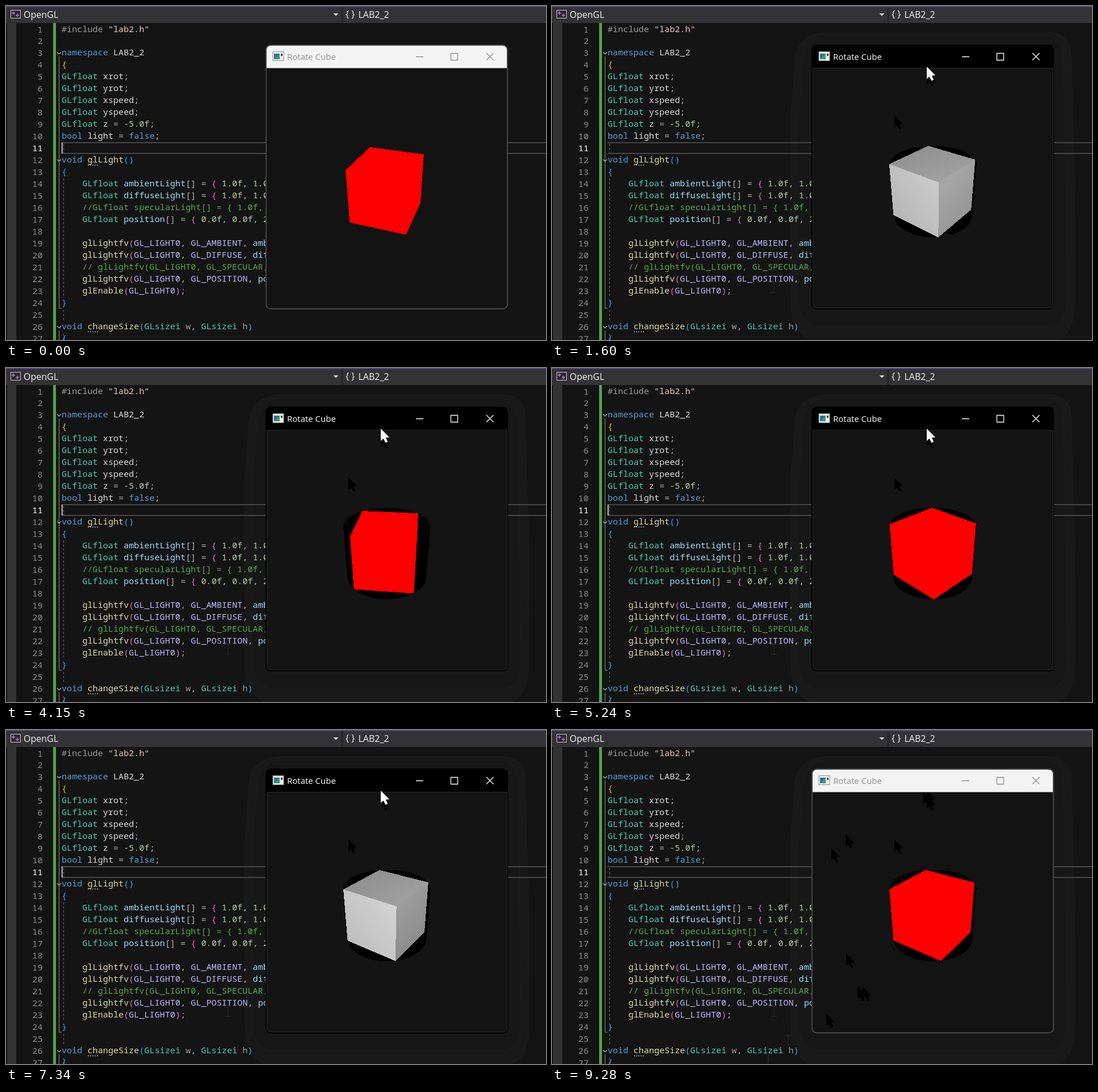
These frames come from a looping animation (951 by 589 pixels, 9.38 s). An HTML page:

```html
<!DOCTYPE html>
<html lang="en">
<head>
<meta charset="utf-8">
<title>Rotate Cube</title>
<style>
  html, body { margin: 0; width: 100%; height: 100%; overflow: hidden; background: #141414; }
  svg { display: block; width: 100vw; height: 100vh; }
  text { white-space: pre; }
  .code text { font: 500 15.17px "Noto Sans Mono", "DejaVu Sans Mono", monospace; }
  .ui { font-family: "Open Sans", "Noto Sans", sans-serif; }
</style>
</head>
<body>
<svg viewBox="0 0 951 589" preserveAspectRatio="none">
  <defs>
    <clipPath id="client"><rect x="459" y="110" width="424" height="423"/></clipPath>
    <path id="arrow" d="M1 0V21.5L5.6 17.4L9.4 25L13.2 23.3L9.9 15.8L16.2 15.2Z"/>
  </defs>
  <rect width="951" height="589" fill="#141414"/>

  <g id="halo" fill="#191919" stroke="#1d1d1d">
    <path d="M480 47H878Q912 50 914 82L917 200L921 330L920 530Q918 580 890 588H455Q424 578 421 530L420 200Q425 150 428 90Q434 52 480 47Z"/>
    <path d="M480 53H874Q899 57 901 90L905 320L907 520Q905 558 880 566H470Q437 560 434 525V200L442 95Q448 58 480 53Z" fill="#171717"/>
  </g>

  <rect x="2" y="30" width="16" height="559" fill="#333"/>
  <rect x="83" y="30" width="5" height="559" fill="#54a14f"/>
  <path d="M98 241H951M98 260H951" stroke="#464646" stroke-width="2"/>
  <g fill="none" stroke="#8a8a8a">
    <path d="M93.500 89V533H98M93.500 277V524M93.500 572V589"/>
    <path d="M101.500 243V259M101.500 304V514M101.500 536V556M101.500 578V589" stroke="#6c6c6c" stroke-dasharray="4 3"/>
  </g>
  <g id="folds" stroke="#b0b0b0" stroke-width="1.200"></g>
  <path d="M144 280.500H163M144 574.500H163" stroke="#aaa" stroke-width="1.500" stroke-dasharray="2 2"/>
  <g id="code" class="code"></g>
  <rect id="caret" x="98" y="241" width="1.500" height="19" fill="#eee"/>

  <g class="ui" font-size="16" fill="#f4f4f4">
    <rect width="951" height="30" fill="#333336"/>
    <rect x="590" y="2" width="4" height="28" fill="#29292b"/>
    <rect width="951" height="1.500" fill="#5d4b99"/>
    <rect x="8.500" y="7.500" width="17" height="14" fill="#29292b" stroke="#ccc"/>
    <path d="M10 12.500H16M13 9.500V15.500M17 16.500H23M20 13.500V19.500" stroke="#b67be0" stroke-width="1.500"/>
    <text x="31" y="21">OpenGL</text>
    <path d="M576.500 13H585.500L581 17.500Z" fill="#ddd"/>
    <text x="598" y="20">{ }</text>
    <text x="620.500" y="21">LAB2_2</text>
  </g>

  <g id="active">
    <rect x="457" y="68" width="427" height="467" rx="9" fill="#000"/>
    <path d="M459.500 109.500H882.500V526Q882.500 532.500 876 532.500H466Q459.500 532.500 459.500 526Z" fill="#141414" stroke="#282828"/>
  </g>
  <g id="idle">
    <rect x="458" y="69" width="425" height="465" rx="8" fill="#131313" stroke="#464646" stroke-width="2"/>
    <path d="M459 109.500V78Q459 70 467 70H874Q882 70 882 78V109.500Z" fill="#f3f3f3"/>
  </g>
  <g>
    <rect x="470" y="80.500" width="19" height="16" fill="#eee" stroke="#8c8c8c"/>
    <rect x="472" y="84" width="10" height="10" fill="#2d6f9f"/>
    <path d="M472 94L482 84V94Z" fill="#3c9a6c"/>
    <path d="M484 84H487V88H484Z" fill="#444"/>
  </g>
  <g id="chrome" class="ui">
    <text x="495" y="94.500" font-size="15" stroke="none">Rotate Cube</text>
    <path d="M722 89.500H735M783.500 83.500H795.500V95.500H783.500ZM846 83L858.500 95.500M858.500 83L846 95.500" fill="none" stroke-width="1.300"/>
  </g>

  <g clip-path="url(#client)">
    <path id="swept" shape-rendering="crispEdges"/>
    <g id="trail"></g>
    <g id="cube" shape-rendering="crispEdges"></g>
  </g>
  <path id="beam" d="M386 487H396M391 487V505M386 505H396" stroke="#262626" stroke-width="1.500"/>
  <path id="beams" d="M411 539H421M416 539V557M375 571H387M381 571V587" stroke="#262626" stroke-width="1.500"/>
  <use id="mouse" href="#arrow" fill="#fff"/>
</svg>
<script>
const $ = id => document.getElementById(id);
const make = (parent, tag, attrs = {}) => {
  const el = document.createElementNS(parent.namespaceURI, tag);
  set(el, attrs);
  return parent.appendChild(el);
};
function set(el, attrs) {
  for (const k in attrs) el.setAttribute(k, attrs[k]);
}
const show = (el, on) => el.setAttribute("visibility", on ? "visible" : "hidden");

// ---- code editor ----
const source = `#include "lab2.h"

namespace LAB2_2
{
GLfloat xrot;
GLfloat yrot;
GLfloat xspeed;
GLfloat yspeed;
GLfloat z = -5.0f;
bool light = false;

void glLight()
{
    GLfloat ambientLight[] = { 1.0f, 1.0f, 1.0f
    GLfloat diffuseLight[] = { 1.0f, 1.0f, 1.0f
    //GLfloat specularLight[] = { 1.0f, 1.0f
    GLfloat position[] = { 0.0f, 0.0f, 2.0f

    glLightfv(GL_LIGHT0, GL_AMBIENT, ambientLight
    glLightfv(GL_LIGHT0, GL_DIFFUSE, diffuseLight
    // glLightfv(GL_LIGHT0, GL_SPECULAR, spec
    glLightfv(GL_LIGHT0, GL_POSITION, position
    glEnable(GL_LIGHT0);
}

void changeSize(GLsizei w, GLsizei h)
{`.split("\n");

const rules = [
  [/^\/\/.*/, "#57a64a"],
  [/^"[^"]*"/, "#e8c9bb"],
  [/^#\w+/, "#9b9b9b"],
  [/^(namespace|bool|false|void)\b/, "#569cd6"],
  [/^GL_\w+/, "#beb7ff"],
  [/^GL\w+/, "#4ec9b0"],
  [/^\w+(?=\()/, "#dcdcaa"],
  [/^(ambientLight|diffuseLight|position)\b/, "#9cdcfe"],
  [/^[wh]\b/, "#9a9a9a"],
  [/^\d[\w.]*/, "#b5cea8"],
  [/^[{}()]/, null],
  [/^\w+/, "#dadada"],
  [/^(\s+|.)/, "#b4b4b4"]
];

source.forEach((line, i) => {
  const y = Math.round(45.5 + 20.97 * i);
  const num = make($("code"), "text", {
    x: 64.5, y: y + 1, "text-anchor": "end", fill: i === 10 ? "#fff" : "#8c8c8c"
  });
  num.textContent = i + 1;
  const text = make($("code"), "text", { x: 98, y });
  const bracket = i === 3 ? "#f2b83b" : line[0] === " " ? "#e46fc4" : "#4a9fe0";
  while (line) {
    const [re, fill] = rules.find(r => r[0].test(line));
    const word = line.match(re)[0];
    make(text, "tspan", { fill: fill || bracket }).textContent = word;
    line = line.slice(word.length);
  }
});
for (const row of [2, 11, 25])
  make($("folds"), "path", { d: `M90 ${81.5 + 21 * (row - 2)}l3.500 3.500l3.500 -3.500`, fill: "none" });

// ---- cube ----
const LOOP = 9380, STEP = 47.35;
const TILT = Math.PI / 6, SIN = Math.sin(TILT), COS = Math.cos(TILT);
const FOCAL = 512, DIST = 5, CX = 670.8, CY = 321.5, LIGHT_Z = 7;
// [step, yaw in degrees]
const yaws = [[0, 25.8], [34, 97], [59, 152.65], [88, 218.7], [136, 328.3], [169, 402.6], [196, 460.7]];

function yawAt(step) {
  let i = 1;
  while (i < yaws.length - 1 && step > yaws[i][0]) i++;
  const [s0, a0] = yaws[i - 1], [s1, a1] = yaws[i];
  return a0 + (a1 - a0) * (step - s0) / (s1 - s0);
}

function corner(deg, y) {
  const a = deg * Math.PI / 180, r = Math.SQRT1_2;
  const x = r * Math.sin(a), z = r * Math.cos(a);
  const ey = y * COS - z * SIN, ez = y * SIN + z * COS;
  const k = FOCAL / (DIST - ez);
  return { x: CX + x * k, y: CY - ey * k, range: Math.hypot(x, ey, LIGHT_Z - ez) };
}

// Visible faces, each with its corners and the facing part of the diffuse term.
function cubeFaces(yaw) {
  const top = [], bottom = [], faces = [];
  for (let i = 0; i < 4; i++) {
    top.push(corner(yaw + 90 * i, 0.5));
    bottom.push(corner(yaw + 90 * i, -0.5));
  }
  faces.push({ pts: top, facing: LIGHT_Z * SIN - 0.5 });
  for (let i = 0; i < 4; i++) {
    const j = (i + 1) % 4;
    const normal = (yaw + 90 * i + 45) * Math.PI / 180;
    const c = Math.cos(normal) * COS;
    if (DIST * c > 0.5)
      faces.push({ pts: [top[i], top[j], bottom[j], bottom[i]], facing: LIGHT_Z * c - 0.5 });
  }
  return faces;
}

const outline = pts => "M" + pts.map(p => p.x.toFixed(1) + " " + p.y.toFixed(1)).join("L") + "Z";
const gray = v => { v = Math.round(Math.min(255, v)); return `rgb(${v},${v},${v})`; };

const slots = [0, 1, 2].map(i => {
  const grad = make($("cube"), "linearGradient", { id: "shade" + i, gradientUnits: "userSpaceOnUse" });
  return {
    grad,
    far: make(grad, "stop", { offset: 0 }),
    near: make(grad, "stop", { offset: 1 }),
    path: make($("cube"), "path")
  };
});

function drawCube(step, lit) {
  const faces = cubeFaces(yawAt(step));
  slots.forEach((slot, i) => {
    const face = faces[i];
    show(slot.path, !!face);
    if (!face) return;
    set(slot.path, { d: outline(face.pts), fill: lit ? `url(#shade${i})` : "#f00" });
    const sorted = [...face.pts].sort((a, b) => b.range - a.range);
    const far = sorted[0], near = sorted[3];
    set(slot.grad, { x1: far.x, y1: far.y, x2: near.x, y2: near.y });
    set(slot.far, { "stop-color": gray(61 + 204 * face.facing / far.range) });
    set(slot.near, { "stop-color": gray(61 + 204 * face.facing / near.range) });
  });
}

// Area already passed over; complete after a quarter turn.
const sweptBy = [""];
for (let s = 0; s < 44; s++)
  sweptBy.push(sweptBy[s] + cubeFaces(yawAt(s)).map(f => outline(f.pts)).join(""));

// ---- pointer ----
// [time, x, y]
const moves = [
  [380, 602, 193], [430, 659, 117], [480, 659, 107],
  [8470, 652, 109], [8530, 516, 184], [8580, 491, 209], [8670, 517, 394],
  [8720, 537, 453], [8770, 546, 453], [8820, 482, 500], [8870, -50, 0]
];
const trail = moves.map(([, x, y]) => make($("trail"), "use", { href: "#arrow", x, y }));

function drawPointer(t) {
  const at = moves.filter(m => m[0] <= t).length - 1;
  trail.forEach((el, i) => show(el, i < at));
  show($("mouse"), at >= 0);
  if (at >= 0) set($("mouse"), { x: moves[at][1], y: moves[at][2] });
}

// ---- timeline ----
const between = (t, a, b) => t >= a && t < b;

function render(t) {
  const step = Math.min(196, Math.floor(t / STEP + 0.4));
  const active = between(t, 560, 8950);
  const lit = between(t, 1290, 3460) || between(t, 7200, 8620);
  show($("active"), active);
  show($("idle"), !active);
  show($("halo"), t >= 560);
  show($("beam"), t >= 330);
  show($("beams"), t >= 8920);
  set($("chrome"), { fill: active ? "#fff" : "#8f8f8f", stroke: active ? "#fff" : "#8f8f8f" });
  show($("caret"), Math.floor(t / 530 + 0.3) % 2 === 0);
  set($("swept"), { d: sweptBy[Math.min(step, 44)] });
  drawPointer(t);
  drawCube(step, lit);
}

function tick() {
  render(performance.now() % LOOP);
  requestAnimationFrame(tick);
}
tick();
</script>
</body>
</html>
```
